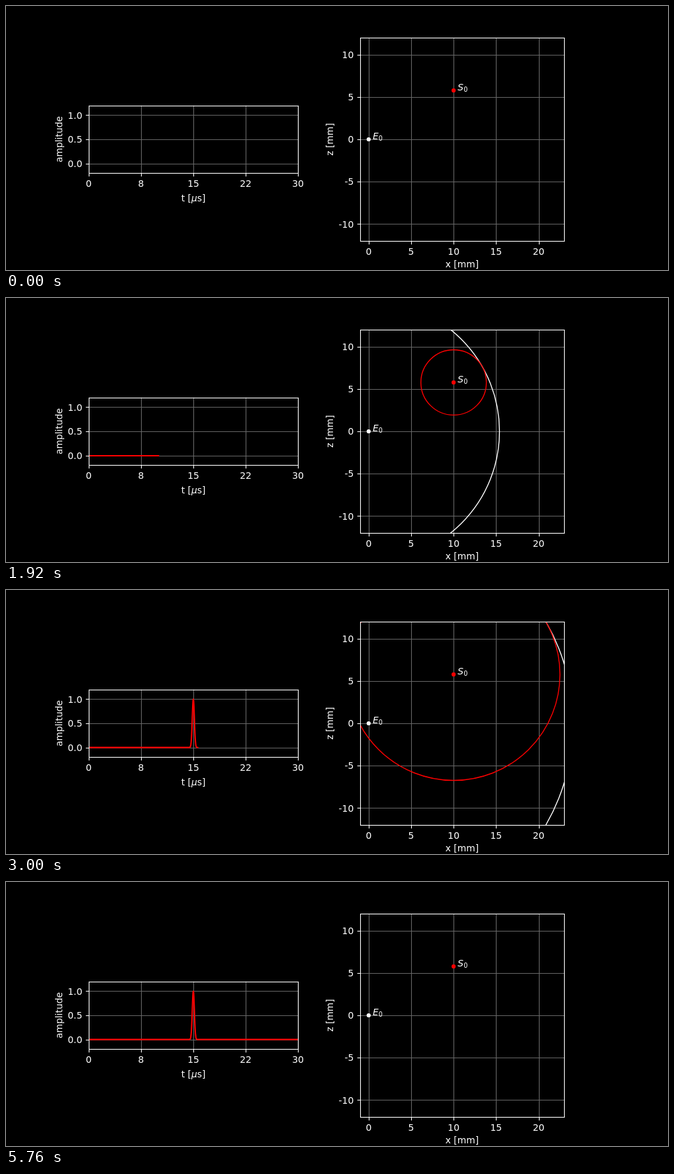
Recreate the animation shown at these times as an HTML page. Size 1000x400 px, loop 8 s.

```html
<!DOCTYPE html>
<html lang="en">
<head>
<meta charset="utf-8">
<title>Pulse echo</title>
<style>
  html, body { margin: 0; width: 100%; height: 100%; overflow: hidden; background: #000; }
  svg { display: block; width: 1000px; height: 400px; }
  text { font: 13.89px "DejaVu Sans", sans-serif; fill: #fff; }
  .var { font-style: italic; }
  .sub { font-size: 9.72px; }
  .grid { stroke: #666; stroke-width: 1.11; }
  .axis { stroke: #fff; stroke-width: 1.11; fill: none; }
  .wave { stroke-width: 1.39; fill: none; }
  .trace { stroke: #f00; stroke-width: 2.08; fill: none; stroke-linecap: square; stroke-linejoin: round; }
</style>
</head>
<body>
<svg id="stage" viewBox="0 0 1000 400"></svg>
<script>
const LOOP = 8000, STEP = 40, LAST_STEP = 144;
const T_MAX = 30, SPEED = 1.54, PULSE_WIDTH = 0.15;
const scatterer = { x: 10, z: 10 * Math.tan(Math.PI / 6) };
const range = Math.hypot(scatterer.x, scatterer.z);
const echoTime = 2 * range / SPEED;

const stage = document.getElementById('stage');
const snap = v => Math.floor(v + 0.5) + 0.5;

function add(parent, tag, attrs = {}, text = '') {
  const el = document.createElementNS('http://www.w3.org/2000/svg', tag);
  for (const key in attrs) el.setAttribute(key, attrs[key]);
  el.textContent = text;
  parent.append(el);
  return el;
}

const line = (cls, x1, y1, x2, y2) => add(stage, 'line', { class: cls, x1, y1, x2, y2 });
const label = (x, y, text, anchor = 'middle') =>
  add(stage, 'text', { x, y, 'text-anchor': anchor }, text);

function makePlot({ id, left, right, top, bottom, xMin, xMax, yMin, yMax }) {
  const clip = add(add(stage, 'clipPath', { id }), 'rect',
    { x: left, y: top, width: right - left, height: bottom - top });
  return {
    left, right, top, bottom, clip: `url(#${id})`,
    scale: (right - left) / (xMax - xMin),
    px: v => left + (v - xMin) / (xMax - xMin) * (right - left),
    py: v => bottom - (v - yMin) / (yMax - yMin) * (bottom - top)
  };
}

// Ticks are [value, label] pairs.
function drawGrid(plot, xTicks, yTicks, xBase) {
  for (const [v, text] of xTicks) {
    const x = snap(plot.px(v)), end = snap(plot.bottom);
    line('grid', x, plot.top, x, plot.bottom);
    line('axis', x, end, x, end + 4.86);
    label(plot.px(v), xBase, text);
  }
  for (const [v, text] of yTicks) {
    const y = snap(plot.py(v)), end = snap(plot.left);
    line('grid', plot.left, y, plot.right, y);
    line('axis', end - 4.86, y, end, y);
    label(plot.left - 9.72, Math.round(plot.py(v) + 5.28), text, 'end');
  }
}

function drawFrame({ left, right, top, bottom }) {
  const x = snap(left), y = snap(top);
  add(stage, 'rect', { class: 'axis', x, y, width: snap(right) - x, height: snap(bottom) - y });
}

function sideLabel(x, text) {
  label(0, 0, text).setAttribute('transform', `translate(${x} 202) rotate(-90)`);
}

function marker(x, z, color, name) {
  const cx = field.px(x), cy = field.py(z), base = Math.round(cy);
  add(stage, 'circle', { cx, cy, r: 3.1, fill: color });
  const text = label(cx + 6.2, base, '', 'start');
  add(text, 'tspan', { class: 'var' }, name);
  add(text, 'tspan', { class: 'sub', y: base + 2 }, '0');
}

const wave = (x, z, stroke) => add(stage, 'circle',
  { class: 'wave', cx: field.px(x), cy: field.py(z), r: 0, stroke, 'clip-path': field.clip });

const signal = makePlot({ id: 'signalClip', left: 125, right: 441, top: 150.67, bottom: 253.33,
  xMin: 0, xMax: T_MAX, yMin: -0.2, yMax: 1.2 });
const field = makePlot({ id: 'fieldClip', left: 535, right: 843, top: 48, bottom: 356,
  xMin: -1, xMax: 23, yMin: -12, yMax: 12 });

drawGrid(signal, [[0, '0'], [7.5, '8'], [15, '15'], [22.5, '22'], [30, '30']],
  [[0, '0.0'], [0.5, '0.5'], [1, '1.0']], 274);
drawGrid(field, [0, 5, 10, 15, 20].map(v => [v, v]), [-10, -5, 0, 5, 10].map(v => [v, v]), 377);

const timeLabel = label(283, 296, 't [');
add(timeLabel, 'tspan', { class: 'var' }, 'μ');
add(timeLabel, 'tspan', {}, 's]');
label(689, 396, 'x [mm]');
sideLabel(85, 'amplitude');
sideLabel(494, 'z [mm]');

const emitted = wave(0, 0, '#fff');
const scattered = wave(scatterer.x, scatterer.z, '#f00');
marker(0, 0, '#fff', 'E');
marker(scatterer.x, scatterer.z, '#f00', 'S');
const trace = add(add(stage, 'g', { 'clip-path': signal.clip }), 'path', { class: 'trace' });
drawFrame(signal);
drawFrame(field);

function tracePath(t) {
  const start = echoTime - 0.8, end = echoTime + 0.8;
  if (t <= 0) return '';
  if (t < start) return `M125 239H${signal.px(t)}`;
  let d = `M125 ${signal.py(0)}`;
  const stop = Math.min(t, end), count = Math.ceil((stop - start) / 0.02);
  for (let i = 0; i <= count; i++) {
    const s = start + (stop - start) * i / Math.max(count, 1);
    const amplitude = Math.exp(-0.5 * ((s - echoTime) / PULSE_WIDTH) ** 2);
    d += `L${signal.px(s).toFixed(2)} ${signal.py(amplitude).toFixed(2)}`;
  }
  return t > end ? d + `H${signal.px(t)}` : d;
}

function setRadius(circle, radius) {
  circle.setAttribute('r', Math.max(0, radius) * field.scale);
  circle.style.display = radius > 0 ? '' : 'none';
}

let shown = -1;
const origin = performance.now();

function render() {
  const elapsed = Math.max(0, performance.now() - origin) % LOOP;
  const step = Math.min(LAST_STEP, Math.floor(elapsed / STEP));
  if (step !== shown) {
    shown = step;
    const t = T_MAX * step / LAST_STEP;
    setRadius(emitted, SPEED * t);
    setRadius(scattered, SPEED * t - range);
    trace.setAttribute('d', tracePath(t));
  }
  requestAnimationFrame(render);
}
render();
</script>
</body>
</html>
```
